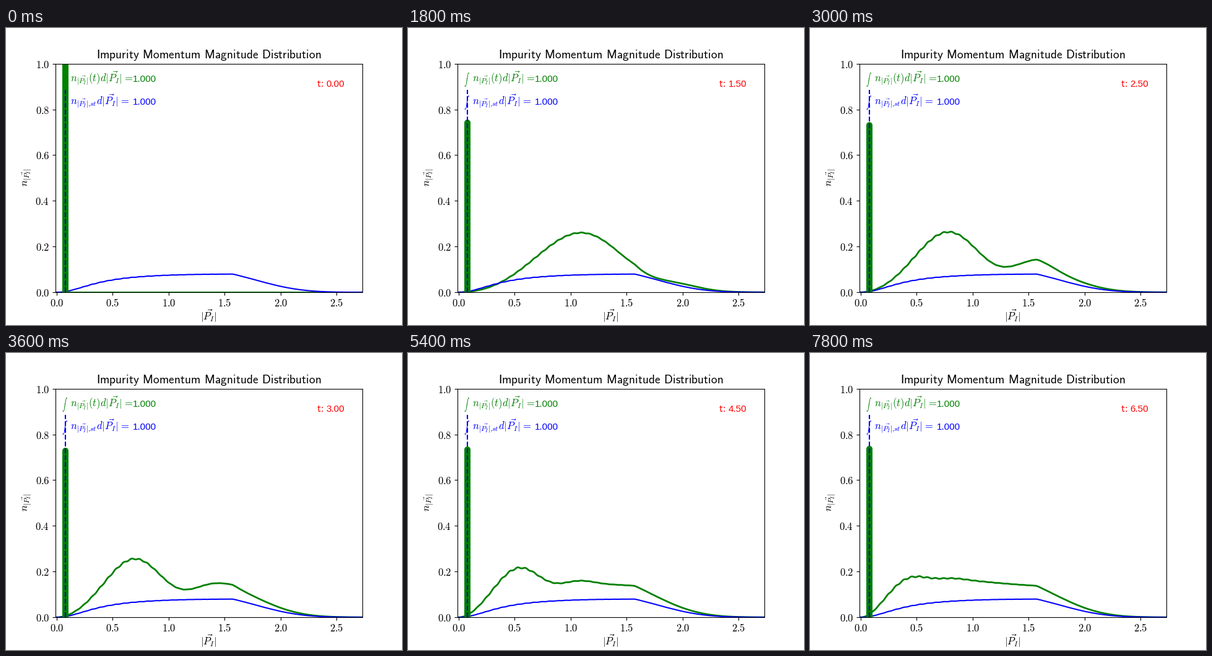
Animation, 640 px wide and 480 px high, one loop 8 s. Source, as a matplotlib script:

```python
import matplotlib.pyplot as plt
import numpy as np
from matplotlib.animation import FuncAnimation

plt.rcParams.update({"mathtext.fontset": "cm", "font.size": 12})

WIDTH, HEIGHT = 640, 480
INTERVAL, HOLD, FRAMES = 100, 3, 80
TIME_STEP = 0.25
K0, STEADY_PEAK = 0.08, 0.885
CUTOFF = 1.57

x = np.linspace(0, 2.73, 274)


def steady_state():
    """Saturating rise with lattice ripple, falling off past the cutoff."""
    rise = 0.0872 * x**2 / (x**2 + 0.151) * (1 - 0.011 * x**2)
    ripple = 1 + 0.035 * np.exp(-1.7 * x) * np.cos(2 * np.pi * (x - 0.24) / 0.0715)
    d = np.maximum(x - CUTOFF, 0)
    return rise * ripple * np.exp(-1.4 * d - 2.3 * d**2 - 1.2 * d**3)


steady = steady_state()
late = steady * (1.33 + 3.1 / (1 + (x / 0.6) ** 2))
energy = 0.8 * x + 0.83 * x**2


def distribution(t):
    """Damped oscillation of each momentum around its late value."""
    phase = energy * t
    damping = np.exp(-0.057 * t**2 - 0.028 * phase**2)
    return late * (1 - damping * np.cos(phase))


fig, ax = plt.subplots(figsize=(WIDTH / 100, HEIGHT / 100), dpi=100)


def label(px, py, text, **style):
    """Text with its anchor at a pixel of the stage, counted from the top."""
    style = {"va": "baseline", **style}
    return fig.text(px / WIDTH, 1 - py / HEIGHT, text, **style)


def number(px, py, value, color, digits):
    return label(px, py, f"{value:.{digits}f}", color=color,
                 family="Liberation Sans", size=11)


def integral(baseline, integrand, color):
    """Integral over the distribution; drawn in the axes so the bar covers it."""
    def put(px, py, text, **style):
        ax.annotate(text, (px, HEIGHT - py), xycoords="figure pixels",
                    color=color, **style)

    put(90, baseline - 4, r"$\int$", size=6, va="center")
    put(104.5, baseline, "$%s\\hspace{0.12}=$" % integrand, va="baseline")
    put(204.5, baseline, "1.000", va="baseline", family="Liberation Sans", size=11)


ax.set(xlim=(-0.01, 2.73), ylim=(0, 1))
title = "Impurity Momentum Magnitude Distribution".replace(" ", r"\hspace{0.38}")
ax.set_title(r"$\mathsf{%s}$" % title, fontsize=14)
for axis in (ax.xaxis, ax.yaxis):
    axis.set_major_formatter("${x:.1f}$")
ax.tick_params(axis="x", pad=2.6)
for spine in ax.spines.values():
    spine.set_zorder(10)

P = r"|\vec{P_I}|"
label(327.5, 472.5, f"${P}$", ha="center")
label(36, 242, "$n_{%s}$" % P, rotation=90, rotation_mode="anchor", ha="center")
integral(87.3, "n_{%s}(t)d%s" % (P, P), "green")
integral(124.2, r"n_{%s,\hspace{-0.2}st}d%s" % (P, P), "blue")
label(501.6, 94.6, r"$\mathsf{t}\hspace{-0.2}:$", color="red")
clock = number(517.5, 94.6, 0, "red", 2)

curve, = ax.plot(x, distribution(0), color="green", lw=2)
ax.plot(x, steady, color="blue", lw=1.5)
bar, = ax.plot([K0, K0], [0, 1], color="green", lw=7.2,
               solid_capstyle="round", zorder=4)
ax.plot([K0, K0], [0, STEADY_PEAK], "--", color="blue", lw=1.5, zorder=5)


def update(frame):
    t = TIME_STEP * (frame // HOLD)
    y = distribution(t)
    curve.set_ydata(y)
    bar.set_ydata([0, 1 - y.sum() * (x[1] - x[0])])
    clock.set_text(f"{t:.2f}")
    return curve, bar, clock


anim = FuncAnimation(fig, update, frames=FRAMES, interval=INTERVAL,
                     repeat=True, repeat_delay=0, blit=False)
plt.show()
```
